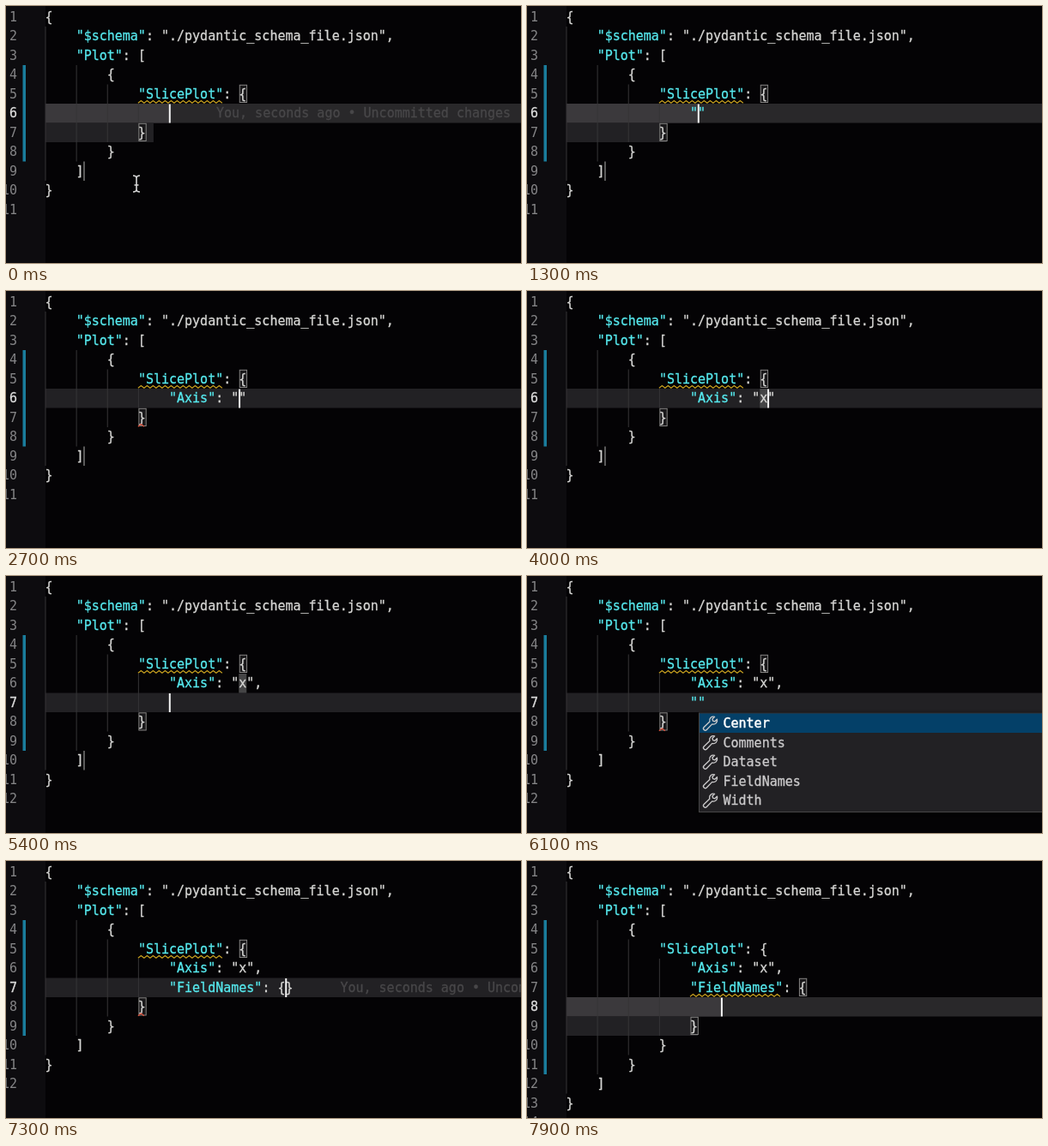
Write an HTML page that moves like this. It is 600 px wide and 300 px high and loops after 8 s.

```html
<!DOCTYPE html>
<html lang="en">
<head>
<meta charset="utf-8">
<title>JSON schema completion</title>
<style>
html, body { margin: 0; width: 100%; height: 100%; overflow: hidden; background: #040305; }
svg { display: block; }
text { font: 15px "DejaVu Sans Mono", "Liberation Mono", monospace; white-space: pre; fill: #d6d6d4; stroke: #d6d6d4; stroke-width: .3px; }
.key { fill: #56e9ee; stroke: #56e9ee; }
.num { fill: #858587; stroke: none; text-anchor: end; }
.num.now { fill: #dcdcdc; stroke: #dcdcdc; }
.ghost { fill: #484749; stroke: #484749; }
.item { fill: #cbcacb; stroke: #cbcacb; }
.item.now { fill: #fff; stroke: #fff; stroke-width: .5px; }
.wave, .icon, .beam { fill: none; }
.icon { stroke: #cbcacb; stroke-width: 1.2; stroke-linejoin: round; }
.beam { stroke: #d8d8d8; stroke-width: 1.6; }
</style>
</head>
<body>
<svg width="600" height="300" viewBox="0 0 600 300">
  <defs>
    <filter id="soft" x="-5%" y="-10%" width="110%" height="120%"><feGaussianBlur stdDeviation="3"/></filter>
  </defs>
  <rect width="46" height="300" fill="#0d0c0f"/>
  <g id="view"></g>
  <rect id="caret" width="2" height="22" fill="#f4f4f4"/>
  <g id="menu"></g>
</svg>
<script>
const LOOP = 8000, CW = 9.03, LH = 22.5, BLINK = 500;
const X = col => 45.5 + col * CW;
const Y = row => 1.5 + (row - 1) * LH;

const head = ['{', '    "$schema": "./pydantic_schema_file.json",', '    "Plot": [',
  '        {', '            "SlicePlot": {'];
const tail = ['            }', '        }', '    ]', '}'];
const pad = ' '.repeat(16);
const axis = pad + '"Axis": "x",';
const fields = ['Axis', 'Center', 'Comments', 'Dataset', 'FieldNames', 'Width'];
const rest = fields.filter(f => f !== 'Axis');
const note = 'You, seconds ago • Uncommitted changes';

// Each step lists what changes; "key" restarts the caret blink.
const steps = [
  { t: 0, key: -200, body: [''], row: 6, col: 16, range: 14, ghost: 22, mark: true, mouse: true,
    warn: [5, 12, 11], boxes: [[5, 25], [7, 12]], error: 0, hit: false, items: null, pick: 0 },
  { t: 1300, key: 1300, body: [pad + '""'], col: 17, ghost: 0, mouse: false, range: 13 },
  { t: 1500, items: fields, error: 7 },
  { t: 2500, key: 2500, body: [pad + '"Axis": ""'], col: 25, items: null, range: 0 },
  { t: 2800, error: 0 },
  { t: 3700, key: 3700, body: [pad + '"Axis": "x"'], col: 26, hit: true },
  { t: 4100, key: 4100, col: 27 },
  { t: 4900, key: 4900, body: [axis], col: 28 },
  { t: 5300, key: 5300, body: [axis, ''], row: 7, col: 16, boxes: [[5, 25], [8, 12]] },
  { t: 5600, key: 5600, body: [axis, pad + '""'], col: 17, hit: false, mark: false },
  { t: 5800, items: rest, error: 8 },
  { t: 6400, pick: 1 },
  { t: 6600, pick: 2 },
  { t: 6900, pick: 3 },
  { t: 7100, key: 7100, body: [axis, pad + '"FieldNames": {}'], col: 31, items: null },
  { t: 7300, ghost: 38 },
  { t: 7400, warn: [7, 16, 12], boxes: [[7, 30], [7, 31]], error: 0 },
  { t: 7600, key: 7600, body: [axis, pad + '"FieldNames": {', '', pad + '}'], row: 8, col: 20,
    range: 17, ghost: 0, boxes: [[7, 30], [9, 16]] }
];
const states = [];
for (const s of steps) states.push({ ...states[states.length - 1], ...s });

const rect = (x, y, w, h, fill, more = '') =>
  `<rect x="${x}" y="${y}" width="${w}" height="${h}" fill="${fill}" ${more}/>`;
const label = (x, y, str, cls = '') => `<text x="${x}" y="${y}" class="${cls}">${str}</text>`;
const text = (x, row, str, cls) => label(x, Y(row) + 16, str, cls);

function code(line, row) {
  const m = line.match(/^(\s*)("[^"]*")(.*)$/);
  return text(X(0), row, m ? `${m[1]}<tspan class="key">${m[2]}</tspan>${m[3]}` : line);
}

function wave(row, col, len, color) {
  const x0 = X(col), end = x0 + len * CW, y = Y(row) + 21.8;
  let d = `M${x0} ${y}`;
  for (let x = x0 + 3.5, up = true; x <= end; x += 3.5, up = !up) d += `L${x} ${y - (up ? 2.8 : 0)}`;
  return `<path class="wave" d="${d}" stroke="${color}" stroke-width="1.1"/>`;
}

function drawView(s) {
  const lines = [...head, ...s.body, ...tail], n = lines.length;
  let out = '';
  // current line and the enclosing range
  out += rect(46, Y(s.row), 554, LH, s.range ? '#29282a' : '#222124');
  if (s.range) {
    out += rect(46, Y(s.row), X(s.col) - 46, LH, '#3b393c');
    out += rect(46, Y(s.row + 1), X(s.range) - 46, LH, '#222124');
  }
  out += rect(19.5, Y(4), 3.5, (n - 5) * LH, '#1a7d9c');
  [2, 4, 5, 6].forEach((from, i) => {
    out += rect(X(i * 4), Y(from), 1, (n - i - from) * LH, '#363537');
  });
  for (const [row, col] of s.boxes)
    out += rect(X(col) + 1, Y(row) + .8, CW - .7, LH - 2.3, '#19181a', 'stroke="#858483"');
  if (s.hit) out += rect(X(25), Y(6), CW, LH, '#454546');
  for (let row = 1; row <= n + 1; row++)
    out += text(13, row, row, row === s.row ? 'num now' : 'num');
  lines.forEach((line, i) => { out += code(line, i + 1); });
  out += wave(...s.warn, '#c9a21f');
  if (s.error) out += wave(s.error, 12, 1, '#e0523c');
  if (s.ghost) out += text(X(s.ghost) + .8, s.row, note, 'ghost');
  if (s.mark) out += rect(90, Y(n - 1), 2, LH, '#5a5a5a');
  if (s.mouse)
    out += '<path class="beam" d="M148 198q4 0 4 3q0-3 4-3M152 200v15M148 217q4 0 4-3q0 3 4 3M149.5 209h5"/>';
  return out;
}

const wrench = 'M1.5 12.2L7.6 6.4C6.6 3 9.4 .3 12.8 1.2L10.4 3.6L11 5.6L13 6.2L15.4 3.8' +
  'C16.2 7.2 13.4 10 10.2 9L4.4 15A2 2 0 0 1 1.5 12.2Z';

function drawMenu(s) {
  if (!s.items) return '';
  const top = Y(s.row + 1) + 1, h = s.items.length * LH + 3;
  let out = rect(200, top + 2, 420, h, '#000', 'filter="url(#soft)"');
  out += rect(200.5, top, 420, h, '#222124', 'stroke="#464547"');
  s.items.forEach((name, i) => {
    const now = i === s.pick, y = top + .5 + i * LH;
    if (now) out += rect(201, y, 399, LH, '#044068');
    out += `<path class="icon" transform="translate(204.5 ${y + 2.5}) scale(1.1)" d="${wrench}"/>`;
    out += label(228.5, y + 16.5, name, now ? 'item now' : 'item');
  });
  return out;
}

const view = document.getElementById('view');
const menu = document.getElementById('menu');
const caret = document.getElementById('caret');
const start = performance.now();
let shown = null;

function frame() {
  const t = Math.max(0, performance.now() - start) % LOOP;
  const s = states.findLast(s => s.t <= t);
  if (s !== shown) {
    view.innerHTML = drawView(s);
    menu.innerHTML = drawMenu(s);
    caret.setAttribute('x', X(s.col) - .2);
    caret.setAttribute('y', Y(s.row) + .5);
    shown = s;
  }
  caret.style.opacity = Math.floor((t - s.key) / BLINK) % 2 ? 0 : 1;
  requestAnimationFrame(frame);
}
frame();
</script>
</body>
</html>
```
